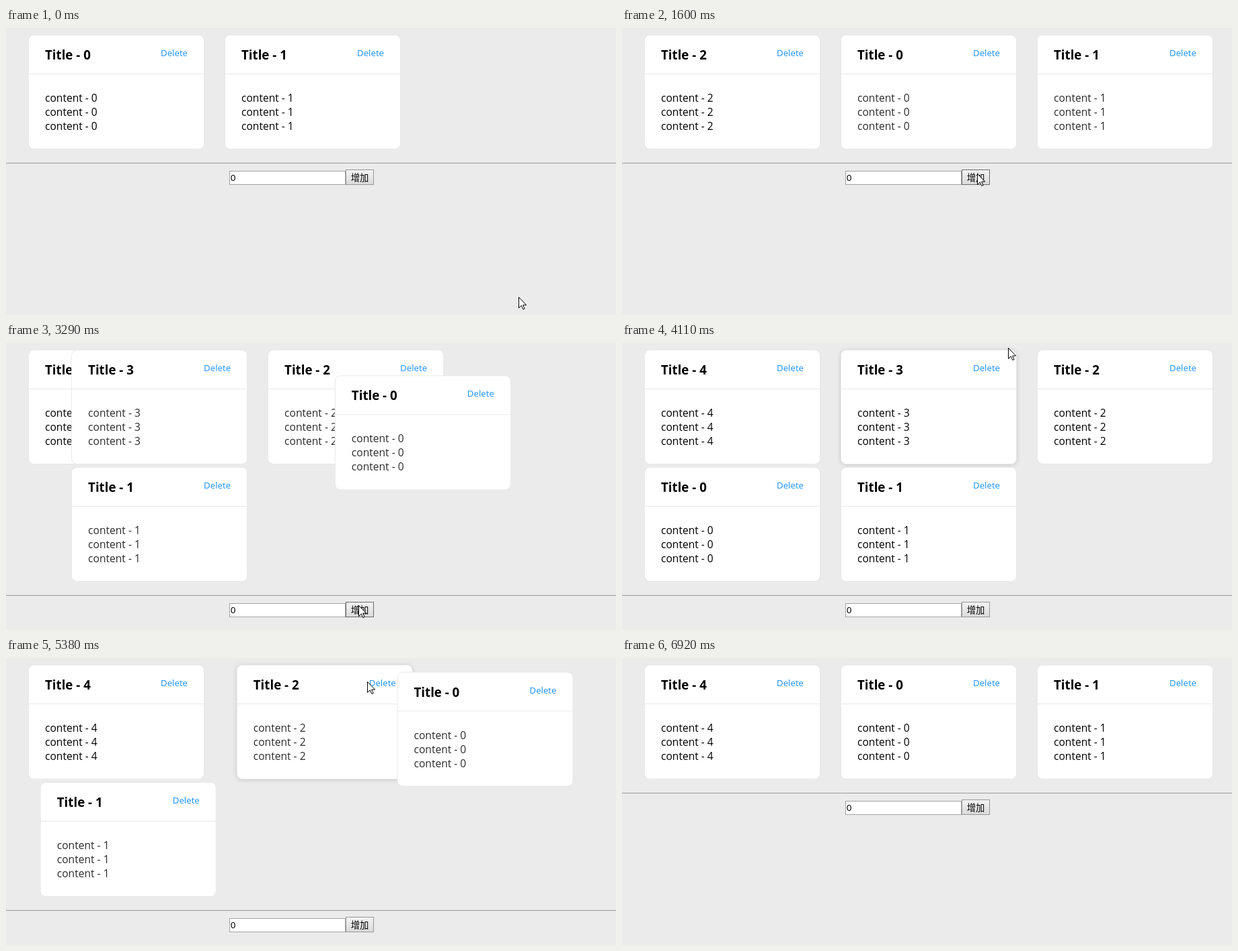
These frames come from a looping animation (907x428 px, 7.15 s). An HTML page:

```html
<!DOCTYPE html>
<html lang="zh">
<head>
<meta charset="utf-8">
<style>
  html, body { margin: 0; height: 100%; overflow: hidden; background: #ebebeb; }
  svg { display: block; width: 100vw; height: 100vh; font: 15.6px "Open Sans", sans-serif; }
  .box { fill: #fff; stroke: #e8e8e8; }
  .hover .box { filter: drop-shadow(0 1px 3px rgba(0, 0, 0, .15)); }
  .moving { fill: #2c2c2c; }
  .title { font-size: 18.72px; font-weight: 700; fill: #000; }
  .delete { font-size: 13.25px; fill: #1890ff; }
  .field { font: 13.33px "Liberation Sans", Arial, sans-serif; }
  .label { font: 13.33px "Noto Sans CJK SC", "Noto Sans CJK", sans-serif; }
  .button { fill: url(#face); stroke: #979797; }
  .button.hover { stroke: #6b6b6b; }
</style>
</head>
<body>
<svg viewBox="0 0 907 428">
  <defs>
    <linearGradient id="face" x2="0" y2="1">
      <stop stop-color="#f4f4f4"/>
      <stop offset="1" stop-color="#dadada"/>
    </linearGradient>
  </defs>
  <g id="form">
    <path d="M0 201.5H907" stroke="#9a9a9a"/>
    <rect x="332.5" y="213.5" width="172" height="20" fill="#fff" stroke="#a3a3a3"/>
    <text class="field" x="334" y="228">0</text>
    <rect class="button" id="button" x="505.5" y="211.5" width="41" height="22"/>
    <text class="label" x="512.7" y="228">增加</text>
  </g>
  <g id="cards"></g>
  <path id="cursor" d="M.5.5v16l3.8-3.6 2.5 5.6 2.4-1-2.5-5.4h5z" fill="#fff" stroke="#000"/>
</svg>
<script>
const LOOP = 7150, MOVE = 950, REFRESH = 73.4;
const COLUMN = 292, ROW = 175, WIDTH = 260, HEIGHT = 169, MARGIN = 6;
const $ = id => document.getElementById(id);

// Each click gives a new card order; the screen shows it from the next refresh on.
const steps = [
  { click: -MOVE, refresh: 100, order: [0, 1] },
  { click: 652, refresh: 710, order: [2, 0, 1] },
  { click: 1840, refresh: 1890, order: [3, 2, 0, 1] },
  { click: 3132, refresh: 3143, order: [4, 3, 2, 0, 1] },
  { click: 4699, refresh: 4700, order: [4, 2, 0, 1] },
  { click: 5810, refresh: 5820, order: [4, 0, 1] }
];

const strokes = [
  { from: 60, to: 310, x: 528, y: 217 },
  { from: 2050, to: 2675, x: 524, y: 391 },
  { from: 3740, to: 4100, x: 574, y: 7 },
  { from: 4150, to: 4460, x: 537, y: 35 },
  { from: 6480, to: 6900, x: 565, y: 432 }
];

const cards = [4, 3, 2, 0, 1].map(id => {
  const node = document.createElementNS("http://www.w3.org/2000/svg", "g");
  const lines = [99, 120, 141].map(y => `<text x="24" y="${y}">content - ${id}</text>`).join("");
  node.innerHTML = `<rect class="box" x="-.5" y="-.5" width="${WIDTH + 1}" height="${HEIGHT + 1}" rx="8"/>
    <path d="M0 57.5H${WIDTH}" stroke="#e8e8e8"/>
    <text class="title" x="24" y="36">Title - ${id}</text>
    <text class="delete" x="196" y="31">Delete</text>${lines}`;
  $("cards").append(node);
  return { id, node };
});

const mix = (a, b, p) => a + (b - a) * p;
const place = (node, x, y) => node.setAttribute("transform", `translate(${x} ${y})`);
const inside = (px, py, x, y, w, h) => px >= x && px < x + w && py >= y && py < y + h;
const slot = i => [34 + i % 3 * COLUMN, 11 + Math.floor(i / 3) * ROW];

// The CSS "ease" curve, cubic-bezier(.25, .1, .25, 1)
function ease(x) {
  if (x <= 0) return 0;
  if (x >= 1) return 1;
  let low = 0, high = 1, s;
  for (let i = 0; i < 20; i++) {
    s = (low + high) / 2;
    if (.75 * s * (1 - s) + s ** 3 < x) low = s; else high = s;
  }
  return .3 * s * (1 - s) ** 2 + 3 * s * s * (1 - s) + s ** 3;
}

function lastRefresh(t) {
  const step = steps.findLast(s => t >= s.refresh);
  if (!step) return 0;
  return step.refresh + REFRESH * Math.floor((t - step.refresh) / REFRESH + .02);
}

function pointerAt(t) {
  let x = 762, y = 401;
  for (const s of strokes) {
    const p = ease((t - s.from) / (s.to - s.from));
    x = mix(x, s.x, p);
    y = mix(y, s.y, p);
  }
  return [x, y];
}

function draw(t) {
  const now = steps.findLastIndex(s => t >= s.click);
  const { click, order } = steps[now];
  const before = steps[Math.max(0, now - 1)].order;
  const p = ease((t - click) / MOVE);
  const [px, py] = pointerAt(t);
  let hovered;

  for (const card of cards) {
    const to = order.indexOf(card.id), was = before.indexOf(card.id);
    card.node.style.display = to < 0 ? "none" : "";
    if (to < 0) continue;
    const from = was < 0 ? to : was;
    const [x0, y0] = slot(from), [x1, y1] = slot(to);
    const x = mix(x0, x1, p), y = mix(y0, y1, p);
    place(card.node, x, y);
    card.node.classList.toggle("moving", p < 1 && from !== to);
    if (inside(px, py, x, y - MARGIN, WIDTH, HEIGHT + MARGIN)) hovered = card;
  }
  for (const card of cards) card.node.classList.toggle("hover", card === hovered);

  const drop = order.length > 3 ? ROW : 0;
  place($("form"), 0, drop);
  $("button").classList.toggle("hover", inside(px, py, 505, 211 + drop, 42, 23));
  place($("cursor"), Math.round(px), Math.round(py));
}

const begin = performance.now();
(function tick() {
  draw(lastRefresh((performance.now() - begin) % LOOP));
  requestAnimationFrame(tick);
})();
</script>
</body>
</html>
```
